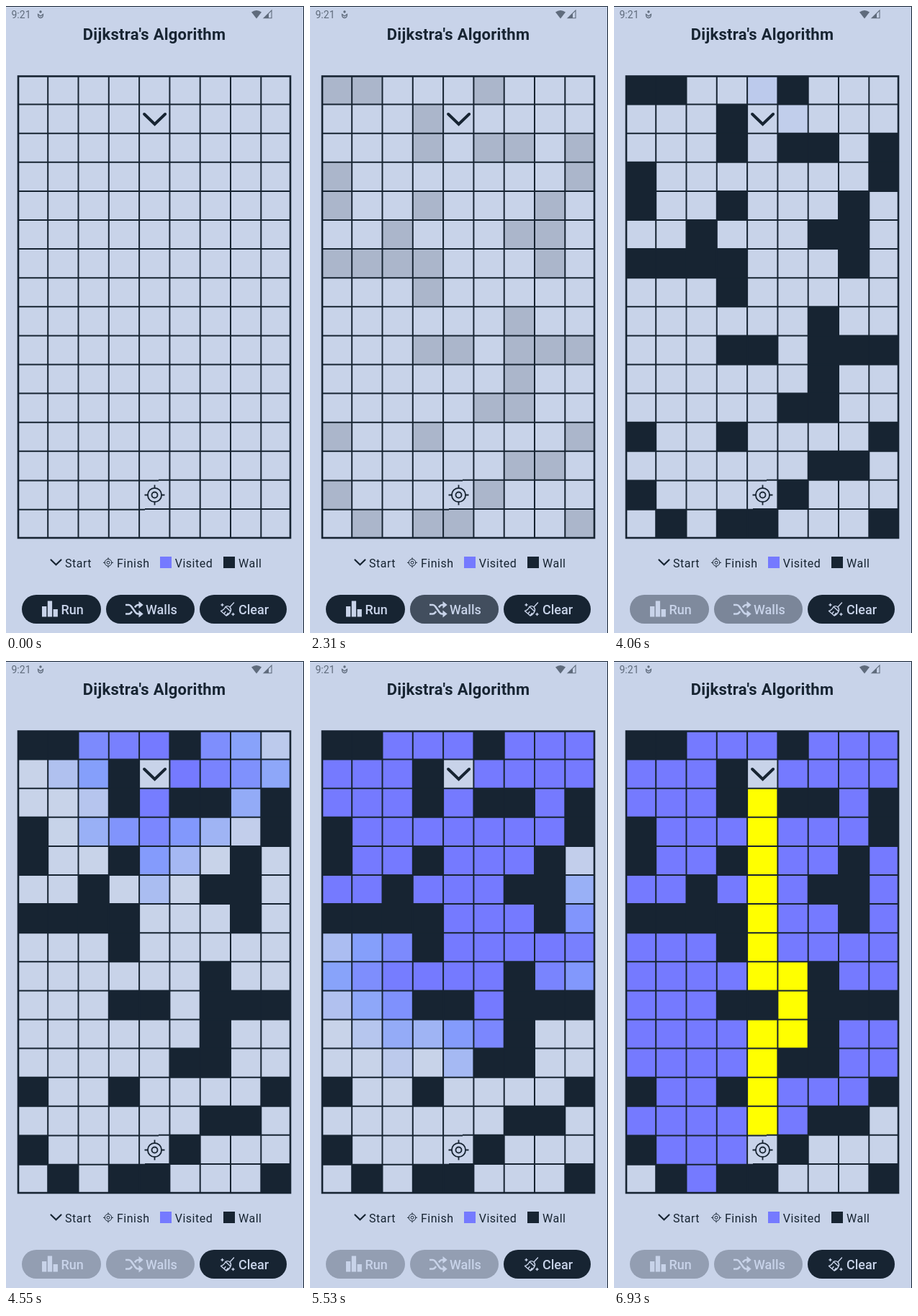
These frames come from a looping animation (414x870 px, 8000 ms). An HTML page:

```html
<!DOCTYPE html>
<html lang="en">
<head>
<meta charset="utf-8">
<title>Dijkstra's Algorithm</title>
<style>
  html, body { margin: 0; width: 100%; height: 100%; overflow: hidden; background: #c8d3e9; }
  svg { display: block; width: 100vw; height: 100vh; font-family: Roboto, sans-serif; --ink: #172432; --paper: #c8d3e9; }
  text { fill: var(--ink); }
  .line { fill: none; stroke: var(--ink); }
  .title { font-size: 22px; font-weight: 600; letter-spacing: .25px; text-anchor: middle; }
  .legend text { font-size: 16px; letter-spacing: .5px; }
  .status, .status text { fill: #5f6b7c; font-size: 14px; }
  .button rect { fill: var(--ink); }
  .button .splash { fill: var(--paper); opacity: 0; }
  .button text { fill: var(--paper); font-size: 18px; font-weight: 500; }
  .icon { fill: var(--paper); }
  .stroke { fill: none; stroke: var(--paper); stroke-width: 2.6; }
</style>
</head>
<body>
<svg viewBox="0 0 414 870">
  <defs>
    <path id="chevron" d="M-14.5-7 0 7 14.5-7" class="line" stroke-linecap="round"/>
    <g id="target" class="line">
      <circle r="9.6"/><circle r="4"/>
      <path d="M0-14v5M0 9v5M-14 0h5M9 0h5"/>
    </g>
  </defs>
  <rect width="414" height="870" fill="#c8d3e9"/>
  <path d="M0 .5H413.5V870" class="line"/>

  <g class="status">
    <text x="7.5" y="17">9:21</text>
    <circle cx="48" cy="8" r="1.7"/>
    <path d="M44.5 11.5q0 5 3.5 5t3.5-5l-3.5 2.5z" fill="none" stroke="#5f6b7c" stroke-width="1.3"/>
    <path d="M341 8.5q7-5 14 0L348 17.5z"/>
    <path d="M358 16.8 369 6V16.8z" fill="none" stroke="#5f6b7c" stroke-width="1.1"/>
    <path d="M358 17 365 10V17z"/>
  </g>
  <text class="title" x="206" y="47">Dijkstra's Algorithm</text>

  <g id="cells"></g>
  <path id="lines" class="line" stroke-width="2"/>
  <rect x="17" y="97.5" width="378" height="640.5" class="line" stroke-width="2.6"/>
  <use href="#chevron" x="206.6" y="157" stroke-width="4"/>
  <g stroke-width="1.8"><use href="#target" x="206.5" y="678.5"/></g>

  <g class="legend">
    <path d="M62.5 768.5 69.5 775.3 76.5 768.5" class="line" stroke-width="2.2" stroke-linecap="round"/>
    <text x="82" y="778.5">Start</text>
    <use href="#target" transform="translate(142 772.3) scale(.5)" stroke-width="2"/>
    <text x="154" y="778.5">Finish</text>
    <rect x="214" y="764" width="16" height="16" fill="#757aff"/>
    <text x="234.7" y="778.5">Visited</text>
    <rect x="302" y="764" width="16" height="16" fill="#172432"/>
    <text x="323" y="778.5">Wall</text>
  </g>

  <g class="button" id="run">
    <rect x="22" y="817" width="110" height="40" rx="20"/>
    <rect class="splash" x="22" y="817" width="110" height="40" rx="20"/>
    <path class="icon" d="M50 833h6.3v14.5H50zM57.8 825.5h6.3v22h-6.3zM65.6 837h6.3v10.5h-6.3z"/>
    <text x="76.5" y="844">Run</text>
  </g>
  <g class="button" id="walls">
    <rect x="139" y="817" width="123" height="40" rx="20"/>
    <rect class="splash" x="139" y="817" width="123" height="40" rx="20"/>
    <path class="stroke" d="M166 831h4.500q2 0 3.500 2l6 8.500q1.500 2 3.500 2h2.500M166 843.500h4.500q2 0 3.500-2l1-1.500M179 834.500l1-1.500q1.500-2 3.500-2h2.500"/>
    <path class="icon" d="M184.500 826l6.200 5-6.200 5zM184.500 838.500l6.200 5-6.200 5z"/>
    <text x="194" y="844">Walls</text>
  </g>
  <g class="button">
    <rect x="269" y="817" width="121" height="40" rx="20"/>
    <g class="stroke" style="stroke-width:1.4" stroke-linejoin="round" stroke-linecap="round">
      <path d="M316.500 828 311 834M305 833.500l7 6.500M305 833.500q3-2 6 .5 2.500 3 1 6-1.500 4-6 6l-7.500-6.500q4.500-1.500 6.500-6M303 843l2-2.500M306 845.500l2.500-3M300.500 829.500v3M299 831h3M315.500 842.500v3M314 844h3"/>
    </g>
    <text x="323" y="844">Clear</text>
  </g>
</svg>
<script>
const LOOP = 8000, TICK = 70;
const WALLS_AT = 2090, WALLS_FADE = 850;
const SEARCH_AT = 3990, STEP = 22.3, FADE = 510;
const COLS = 9, ROWS = 16;
const START = 1 * COLS + 4, FINISH = 14 * COLS + 4;
const MAZE = `##...#...
...#.....
...#.##.#
#.......#
#..#...#.
..#...##.
####...#.
...#.....
......#..
...##.###
......#..
.....##..
#..#....#
......##.
#....#...
.#.##...#`.replace(/\n/g, '');

const PAPER = [200, 211, 233], INK = [23, 36, 50], VISITED = [117, 122, 255];
const wallStops = [[0, PAPER], [1, INK]];
const visitStops = [[0, PAPER], [.5, [134, 161, 251]], [1, VISITED]];
const pathStops = [[0, VISITED], [.33, [184, 212, 186]], [.6, [224, 234, 118]], [1, [255, 255, 0]]];

const byId = id => document.getElementById(id);
const clamp = (v, lo = 0, hi = 1) => Math.min(hi, Math.max(lo, v));
const easeInOut = p => p * p * (3 - 2 * p);

function blend(stops, p) {
  const i = Math.max(1, stops.findIndex(([at]) => at >= p));
  const [a, from] = stops[i - 1], [b, to] = stops[i];
  const k = (p - a) / (b - a);
  return `rgb(${from.map((v, c) => Math.round(v + (to[c] - v) * k))})`;
}

// Neighbours in the order up, left, right, down.
function neighbours(n) {
  const c = n % COLS, list = [];
  if (n >= COLS) list.push(n - COLS);
  if (c > 0) list.push(n - 1);
  if (c < COLS - 1) list.push(n + 1);
  if (n < COLS * (ROWS - 1)) list.push(n + COLS);
  return list.filter(m => MAZE[m] !== '#');
}

function search() {
  const dist = { [START]: 0 }, parent = {}, order = [START];
  for (const n of order) {
    for (const m of neighbours(n)) {
      if (!(m in dist)) {
        dist[m] = dist[n] + 1;
        order.push(m);
      }
      if (dist[m] === dist[n] + 1) parent[m] = n;
    }
  }
  const path = [];
  for (let n = parent[FINISH]; n !== START; n = parent[n]) path.unshift(n);
  return { order, path };
}

// The search pauses at the finish while the path is laid out.
const visitAt = {}, pathAt = {};
const { order, path } = search();
const found = order.indexOf(FINISH);
const stepTime = i => SEARCH_AT + STEP * i;
order.forEach((n, i) => visitAt[n] = stepTime(i > found ? i + path.length : i));
path.forEach((n, i) => pathAt[n] = stepTime(found + 1 + i));

const colX = c => clamp(15.9 + 42.3 * c, 17, 395);
const rowY = r => clamp(96.5 + 40.1 * r, 97, 738);

const cells = [...MAZE].map((_, n) => {
  const c = n % COLS, r = Math.floor(n / COLS);
  const rect = document.createElementNS('http://www.w3.org/2000/svg', 'rect');
  const box = { x: colX(c), y: rowY(r), width: colX(c + 1) - colX(c), height: rowY(r + 1) - rowY(r) };
  for (const key in box) rect.setAttribute(key, box[key]);
  return byId('cells').appendChild(rect);
});

let lines = '';
for (let c = 1; c < COLS; c++) lines += `M${colX(c)} 97V738`;
for (let r = 1; r < ROWS; r++) {
  const y = rowY(r), bend = { 14: 212, 15: 193 }[r];
  lines += bend ? `M17 ${y + .7}H${bend}M${bend} ${y - .1}H395` : `M17 ${y}H395`;
}
byId('lines').setAttribute('d', lines);

function cellColor(n, t) {
  if (MAZE[n] === '#') return blend(wallStops, easeInOut(clamp((t - WALLS_AT) / WALLS_FADE)));
  if (n === START || n === FINISH) return blend(wallStops, 0);
  if (t >= pathAt[n]) return blend(pathStops, clamp((t - pathAt[n]) / FADE));
  return blend(visitStops, clamp((t - (visitAt[n] ?? LOOP)) / FADE));
}

const splash = (t, at) => .24 * clamp((t - at) / 180) * clamp((at + 720 - t) / 300);

function draw(now) {
  const t = Math.floor(now % LOOP / TICK) * TICK;
  cells.forEach((cell, n) => cell.setAttribute('fill', cellColor(n, t)));
  const off = clamp((t - 3900) / 200);
  for (const [id, at] of [['run', 3860], ['walls', 2060]]) {
    const button = byId(id);
    button.querySelector('rect').style.opacity = 1 - .7 * off;
    button.querySelector('.splash').style.opacity = splash(t, at) * (1 - off);
  }
}

const begin = performance.now();
function frame() {
  draw(performance.now() - begin);
  requestAnimationFrame(frame);
}
frame();
</script>
</body>
</html>
```
